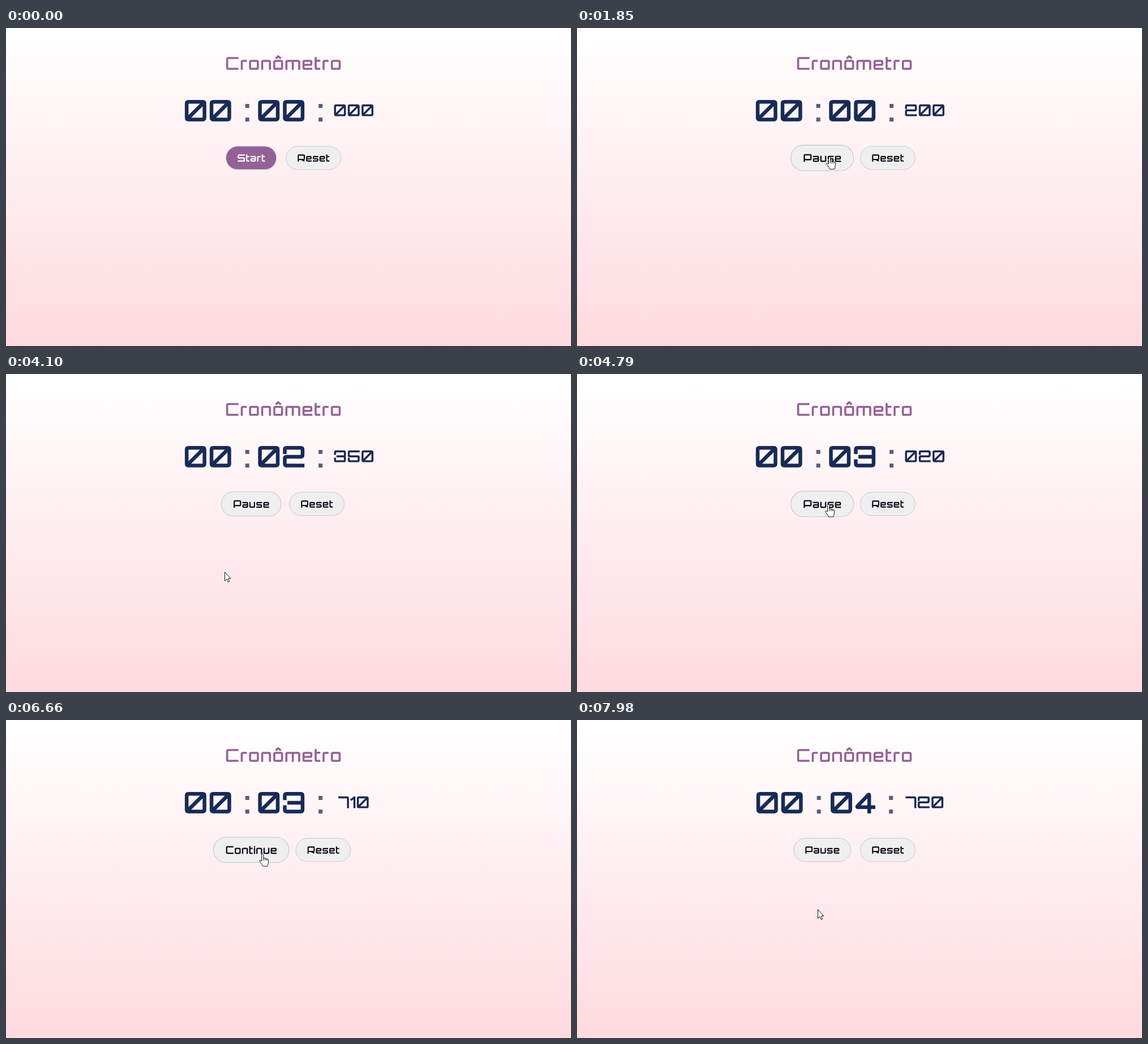
These frames come from a looping animation (998x561 px, 8 s). An HTML page:

```html
<!DOCTYPE html>
<html lang="pt">
<head>
<meta charset="utf-8">
<title>Cronômetro</title>
<style>
  html, body { margin: 0; width: 100%; height: 100%; overflow: hidden; }
  svg { display: block; width: 998px; height: 561px; }
  text { font-family: "DejaVu Sans", sans-serif; fill: none; }
  .word path { fill: none; stroke: currentColor; stroke-linecap: square; stroke-linejoin: round; }
</style>
</head>
<body>
<svg viewBox="0 0 998 561">
  <defs>
    <linearGradient id="sky" x2="0" y2="1">
      <stop stop-color="#fff"/>
      <stop offset="1" stop-color="#feдae0"/>
    </linearGradient>
    <path id="dots" fill="#5e5b7b" d="M-3.5 134h7v7h-7zM-3.5 158h7v7h-7z"/>
  </defs>
  <rect width="998" height="561" fill="url(#sky)"/>
  <g id="title" class="word" color="#956195"></g>
  <g id="min" class="word" color="#182b56"></g>
  <use id="colonA" href="#dots"/>
  <g id="sec" class="word" color="#182b56"></g>
  <use id="colonB" href="#dots"/>
  <g id="ms" class="word" color="#1a2853"></g>
  <g id="main">
    <rect id="mainBox" y="-20.5" height="41" rx="20.5" stroke="#c9c5d0"/>
    <g id="mainText" class="word"></g>
  </g>
  <g id="reset">
    <rect id="resetBox" y="-20.5" height="41" rx="20.5" fill="#efefef" stroke="#c9c8d8"/>
    <g id="resetText" class="word" color="#0b0c1a"></g>
  </g>
  <circle id="press" r="12.5" fill="#fcf63c" fill-opacity=".65"/>
  <path id="hand" fill="#fff" stroke="#111" d="M-1.5 13V1.6A1.6 1.6 0 0 1 1.7 1.6V8Q4.7 6 4.7 9Q7.7 7 7.7 10Q10.4 8 10.4 11V15Q10 19 8.6 22H.4Q0 20-5.4 12.6Q-5.5 10-1.5 13ZM1.7 8V12M4.7 9V12M7.7 10V12"/>
  <path id="arrow" fill="#fff" stroke="#111" d="M.5 .5V16L4 12.8 6.3 18 8.7 17 6.4 11.8H11Z"/>
</svg>
<script>
const $ = id => document.getElementById(id);
$("sky").lastElementChild.setAttribute("stop-color", "#fedae0");

// Each stroke visits nodes of a 5 x 5 grid lettered a to y, row by row
const shapes = {
  0: "ceyuac ue", 1: "ey fe", 2: "faeokuy", 3: "faeyup lo", 4: "xdpt",
  5: "eakoyup", 6: "eauyok", 7: "aey", 8: "ceyuac ko", 9: "okaeyu",
  C: "eauy", P: "uaetp", R: "uaetp ry", S: "eakoyu",
  a: "aeyuko", e: "yuaeok", i: "fu aa", m: "uaey cw", n: "uaey",
  o: "ceyuac", "ô": "ceyuac", r: "uae", s: "eakoyu", t: "auy fj", u: "auye"
};
const narrow = { 1: 39.5, 4: 75.7, 7: 71.5, C: 81, i: 22, m: 95, r: 46, t: 44 };
const isLow = c => "aemnoôrsu".includes(c);
const advance = c => narrow[c] || (isLow(c) ? 67 : 84.4);
const measure = (str, size) => [...str].reduce((w, c) => w + advance(c), 0) * size / 100;
const mix = (a, b, u) => a + (b - a) * u;
const toward = (p, q, d) => {
  const u = Math.min(0.5, d / Math.hypot(q[0] - p[0], q[1] - p[1]));
  return [mix(p[0], q[0], u), mix(p[1], q[1], u)];
};

function stroke(nodes, c) {
  const side = narrow[c] && c < "A" ? 9 : 12, top = isLow(c) ? -50 : -66;
  let pts = [...nodes].map(n => {
    const i = n.charCodeAt(0) - 97;
    return [mix(side, advance(c) - side, i % 5 / 4), mix(top, -6, Math.floor(i / 5) / 4)];
  });
  const [p, q] = pts;
  // A lone diagonal stops short of the corners
  if (pts.length === 2 && p[0] !== q[0] && p[1] !== q[1])
    pts = [0.14, 0.86].map(u => [mix(p[0], q[0], u), mix(p[1], q[1], u)]);
  let d = "M" + pts[0];
  for (let i = 1; i < pts.length - 1; i++)
    d += `L${toward(pts[i], pts[i - 1], 6)}Q${pts[i]} ${toward(pts[i], pts[i + 1], 6)}`;
  return d + "L" + pts[pts.length - 1];
}

function glyph(c) {
  const hat = c === "ô" ? "M24-67L34-76L44-67" : "";
  return shapes[c].split(" ").map(s => stroke(s, c)).join("") + hat;
}

function write(id, str, cx, base, size, pen = 12) {
  const el = $(id);
  place(id, cx - measure(str, size) / 2, base, size / 100);
  if (el.dataset.str === str) return;
  el.dataset.str = str;
  let x = 0, out = `<text font-size="100">${str}</text>`;
  for (const c of str) {
    out += `<path stroke-width="${pen}" transform="translate(${x})" d="${glyph(c)}"/>`;
    x += advance(c);
  }
  el.innerHTML = out;
}

const place = (id, x, y, s = 1) =>
  $(id).setAttribute("transform", `translate(${x} ${y}) scale(${s})`);
const show = (id, on) => $(id).setAttribute("visibility", on ? "visible" : "hidden");
const clamp = u => Math.min(1, Math.max(0, u));
const ease = u => u * u * (3 - 2 * u);

const LOOP = 8000, STEP = 70, ENTER = 210;
const START = 1641, PAUSE = 5502, RESUME = 6925, RATE = 0.961;
const CENTER = 490, ROW = 229.2, GAP = 16, LABEL = 17.6;

// The picture advances in steps, re-synchronised at these times
const syncs = [0, ENTER, 1030, 1850, 2680, 3530, 4370, 5210, 6170, 7000, 7840];
function snap(t) {
  const from = syncs.filter(s => s <= t).pop();
  return from && from + STEP * Math.floor((t - from) / STEP);
}

// Pointer moves: begin, end, x, y
const moves = [
  [ENTER, 960, 447, 304], [1030, 1300, 446, 227],
  [3880, 4090, 386, 349], [4090, 4170, 403, 358], [4170, 4600, 444, 230],
  [5425, 5650, 445, 305], [6170, 6560, 453, 236],
  [7180, 7770, 427, 348], [7770, 7980, 425, 334]
];
function pointer(t) {
  let x = 939, y = 542;
  for (const [a, b, nx, ny] of moves) {
    const u = ease(clamp((t - a) / (b - a)));
    x = mix(x, nx, u);
    y = mix(y, ny, u);
  }
  return [x, y];
}
const hovering = t => pointer(t)[1] < 252;

// Share of the last 300 ms spent over the button
function hoverAmount(t) {
  let sum = 0;
  for (let ago = 0; ago < 300; ago += 20) sum += hovering(t - ago);
  return sum / 15;
}

function button(id, label, left) {
  const width = measure(label, LABEL) + 39.8, box = $(id + "Box");
  box.setAttribute("x", 0.5 - width / 2);
  box.setAttribute("width", width - 1);
  write(id + "Text", label, 0.2, 6.5, LABEL);
  return width;
}

function drawButtons(t) {
  const idle = t < START;
  const label = idle ? "Start" : t >= PAUSE && t < RESUME ? "Continue" : "Pause";
  const w = button("main", label), r = button("reset", "Reset");
  const left = CENTER - (w + GAP + r) / 2;
  $("mainBox").setAttribute("fill", idle ? "#946196" : "#efefef");
  $("mainText").setAttribute("color", idle ? "#fff" : "#0b0c1a");
  place("main", left + w / 2, ROW, 1 + 0.1 * hoverAmount(t));
  place("reset", left + w + GAP + r / 2, ROW);
}

function drawClock(t) {
  const run = Math.max(0, Math.min(t, PAUSE) - START) + Math.max(0, t - RESUME);
  const ms = Math.floor(run * RATE / 10) * 10;
  const sec = String(Math.floor(ms / 1000)).padStart(2, "0");
  const nudge = measure(sec, 1) < measure("00", 1) ? 1 : 0;
  write("min", "00", 356.8 + nudge, 164.6, 52, 12.5);
  write("sec", sec, 486.2 + nudge / 2, 164.6, 52, 12.5);
  write("ms", String(ms % 1000).padStart(3, "0"), 614.2, 155.6, 28.8);
  place("colonA", 426.2 + nudge, 0);
  place("colonB", 555.6 - nudge, 0);
}

function drawPointer(t) {
  const over = hovering(t);
  for (const id of ["press", "hand", "arrow"]) place(id, ...pointer(t));
  show("press", [START, PAUSE, RESUME].some(c => t > c - 100 && t < c + 30));
  show("hand", over);
  show("arrow", !over && t >= ENTER);
}

function draw(time) {
  const t = snap(time);
  drawClock(t);
  drawButtons(t);
  drawPointer(t);
}

write("title", "Cronômetro", 490, 74, 31.9, 11.2);

let origin;
function tick(now) {
  origin ??= now;
  draw((now - origin) % LOOP);
  requestAnimationFrame(tick);
}
draw(0);
requestAnimationFrame(tick);
</script>
</body>
</html>
```
